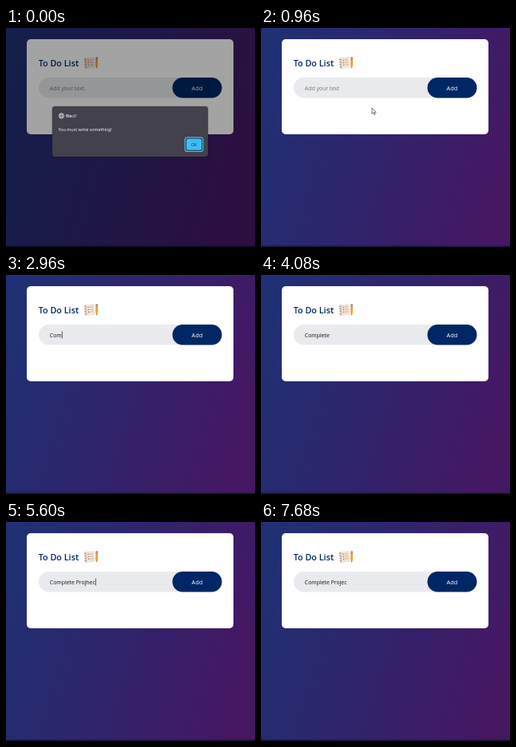
These frames come from a looping animation (312 by 274 pixels, 8 s). An HTML page:

```html
<!DOCTYPE html>
<html lang="en">
<head>
<meta charset="utf-8">
<title>To Do List</title>
<style>
  html, body { margin: 0; width: 100%; height: 100%; overflow: hidden; background: #2d276b; }
  svg { display: block; width: 312px; height: 274px; }
  text { font-family: "Open Sans", "Noto Sans", sans-serif; white-space: pre; }
</style>
</head>
<body>
<svg viewBox="0 0 312 274">
  <defs>
    <linearGradient id="night" gradientUnits="userSpaceOnUse" x1="0" y1="70" x2="306" y2="160">
      <stop offset="0" stop-color="#1f3074"/>
      <stop offset=".5" stop-color="#30246c"/>
      <stop offset="1" stop-color="#451763"/>
    </linearGradient>
  </defs>

  <rect width="312" height="274" fill="url(#night)"/>
  <rect y="272.3" width="312" height="1.7" fill="#1b1735"/>
  <rect x="26" y="14" width="259" height="119" rx="5" fill="#fff"/>

  <text x="40.7" y="48" font-size="10.8" font-weight="600" fill="#002765">To Do List</text>
  <g id="notepad">
    <path d="M98.5 37.5 110.5 36 112 49.5 99.5 51Z" fill="#f3e3d2"/>
    <path d="M98.5 37.5 100.3 37.3 101.3 50.8 99.5 51Z" fill="#d9c3ad"/>
    <path d="M97.8 39.5h2.4M98 42.5h2.4M98.2 45.5h2.4M98.4 48.5h2.4" stroke="#8c8791" stroke-width=".7"/>
    <path d="M104.8 40.2 109 39.7M105.1 43.2 109.3 42.7M105.4 46.2 109.6 45.7" stroke="#b3a59b" stroke-width=".7"/>
    <path d="M102.3 40.4h1.4M102.6 43.4h1.4M102.9 46.4h1.4" stroke="#d2605b" stroke-width="1.1"/>
    <path d="M112.2 39.5h2.9v7.3l-1.4 3.4-1.5-3.4Z" fill="#f5a12d"/>
    <path d="M112.2 38.2h2.9v1.7h-2.9Z" fill="#4bb3d8"/>
    <path d="M112.2 38.2v-1q1.4-2 2.9 0v1Z" fill="#e56a5c"/>
    <path d="M113.1 48.6h1.2l-.6 1.8Z" fill="#3b3a45"/>
  </g>

  <rect x="41" y="62" width="229" height="25.5" rx="12.75" fill="#e9eaee"/>
  <text id="entry" x="54.8" y="77.8" font-size="6.9"></text>
  <rect id="caret" y="70.5" width=".7" height="9" fill="#222"/>
  <rect x="208.5" y="62" width="62" height="25.5" rx="12.75" fill="#002765"/>
  <text x="239.4" y="77.8" font-size="7.4" text-anchor="middle" fill="#fff">Add</text>

  <g id="dialog">
    <rect width="312" height="274" fill="#000" opacity=".36"/>
    <rect x="57" y="97.5" width="197" height="65" rx="4" fill="#000" opacity=".16"/>
    <rect x="58" y="98" width="195" height="63" rx="3.5" fill="#42414c"/>
    <g fill="none" stroke="#f2f2f4" stroke-width=".6">
      <circle cx="69.4" cy="109.9" r="3.2"/>
      <ellipse cx="69.4" cy="109.9" rx="1.4" ry="3.2"/>
      <path d="M66.5 108.7h5.8M66.5 111.1h5.8"/>
    </g>
    <text x="75" y="111.9" font-size="5.2" font-weight="600" fill="#fff">file://</text>
    <text x="65.6" y="128.7" font-size="5.4" fill="#fff">You must write something!</text>
    <rect x="224.4" y="136.8" width="22.4" height="17.6" rx="3" fill="#2b2a33" stroke="#45c1f3" stroke-width="1.2"/>
    <rect id="ok" x="226" y="138.4" width="19.2" height="14.4" rx="2"/>
    <text x="235.6" y="147.6" font-size="5.3" text-anchor="middle" fill="#2b2a33">OK</text>
  </g>

  <path id="arrow" d="M0 0V7.4L1.7 5.8 2.9 8.5 4.1 8 2.9 5.4H5.3Z" fill="#fff" stroke="#222" stroke-width=".6"/>
  <path id="beam" d="M-1.2-4H1.2M0-4V4M-1.2 4H1.2" fill="none" stroke="#444" stroke-width=".6"/>
</svg>

<script>
const LOOP = 8000, STEP = 80, CLOSE = 960, FOCUS = 1280, FIRST_KEY = 2480;
const el = id => document.getElementById(id);
const show = (id, on) => { el(id).style.display = on ? "" : "none"; };

// [time, entry text, caret visible]
const typing = [
  [0, "", 0], [FOCUS, "", 1], [1760, "", 0], [2320, "", 1],
  [FIRST_KEY, "C", 1], [2800, "Co", 1], [2960, "Com", 1], [3120, "Comp", 1],
  [3600, "Compl", 1], [3760, "Comple", 1], [3840, "Complet", 1], [3920, "Complete", 1],
  [4080, "Complete ", 0], [4320, "Complete ", 1], [4480, "Complete P", 1],
  [4800, "Complete Pr", 1], [4960, "Complete Pro", 1], [5120, "Complete Proj", 1],
  [5280, "Complete Projh", 1], [5360, "Complete Projhe", 1], [5520, "Complete Projhec", 1],
  [6000, "Complete Projhec", 0], [6480, "Complete Projhe", 1], [6560, "Complete Projh", 1],
  [6640, "Complete Proj", 1], [6960, "Complete Proje", 1], [7360, "Complete Projec", 1],
  [7680, "Complete Projec", 0]
];

// [time, x, y]
const pointer = [
  [560, 262, 155], [720, 236, 147], [800, 236, 147], [880, 181, 125],
  [960, 139, 100], [1040, 116, 88], [1120, 106, 78], [1280, 103, 76]
];

const current = (keys, t) => keys.findLast(k => k[0] <= t);

function pointerAt(t) {
  const a = current(pointer, t) || pointer[0];
  const b = pointer.find(k => k[0] > t) || a;
  const p = b === a ? 0 : Math.max(0, (t - a[0]) / (b[0] - a[0]));
  return [1, 2].map(i => a[i] + (b[i] - a[i]) * p);
}

function draw(t) {
  const [, text, caretOn] = current(typing, t);
  const entry = el("entry");
  entry.textContent = text || "Add your text";
  entry.setAttribute("fill", text ? "#141414" : "#77787d");
  const width = text ? entry.getComputedTextLength() : 0;
  el("caret").setAttribute("x", 55 + width);
  show("caret", caretOn);

  show("dialog", t < CLOSE);
  el("ok").setAttribute("fill", t < 640 ? "#3fbdf5" : "#93d9f8");

  const place = `translate(${pointerAt(t)})`;
  el("arrow").setAttribute("transform", place);
  el("beam").setAttribute("transform", place);
  show("arrow", t >= 560 && t < 1120);
  show("beam", t >= 1120 && t < FIRST_KEY);
}

const start = performance.now();
function tick() {
  const t = (performance.now() - start) % LOOP;
  draw(Math.floor(t / STEP) * STEP);
  requestAnimationFrame(tick);
}
tick();
</script>
</body>
</html>
```
